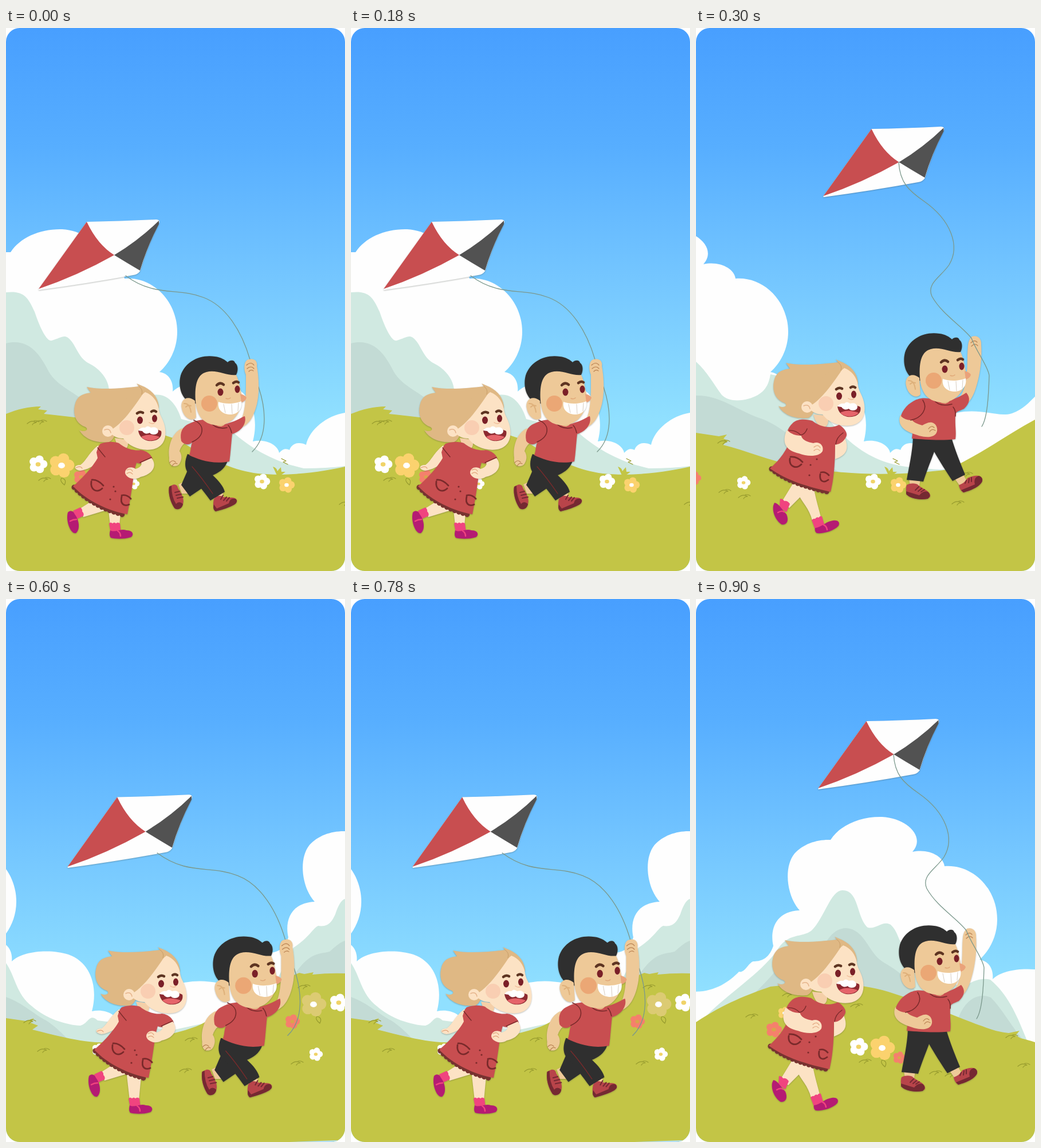
Write an HTML page that moves like this. It is 592 px wide and 947 px high and loops after 1.2 s.

```html
<!DOCTYPE html>
<html lang="en">
<head>
<meta charset="utf-8">
<title>Kite run</title>
<style>
html, body { margin: 0; width: 100%; height: 100%; overflow: hidden; background: #fff; }
svg { display: block; width: 592px; height: 947px; }
.soft { filter: drop-shadow(0 1.5px 1px rgba(60, 70, 60, .35)); }
</style>
</head>
<body>
<svg id="stage" viewBox="0 0 592 947"></svg>
<script>
const C = {
  hill: '#c3c546', grass: '#969a2e', mint: '#d0e9e1', slate: '#c3dbd5', red: '#c84e50', dark: '#7a2a2b',
  ink: '#2f2f2f', tan: '#eec998', fair: '#fce2c4', hair: '#dfb884', eye: '#7a2028', brow: '#5e3522',
  pink: '#f0447f', plum: '#b51b73', shoe: '#b8444a', sole: '#752932', string: '#7b988c'
};
const fill = (d, c) => `<path d="${d}" fill="${c}"/>`;
const line = (d, c, w = 1.5) =>
  `<path d="${d}" fill="none" stroke="${c}" stroke-width="${w}" stroke-linecap="round" stroke-linejoin="round"/>`;
const dot = (x, y, rx, c, ry = rx) => `<ellipse cx="${x}" cy="${y}" rx="${rx}" ry="${ry}" fill="${c}"/>`;
const group = (id, ...parts) => `<g id="${id}">${parts.join('')}</g>`;
const use = (id, x = 0, y = 0) => `<use href="#${id}" transform="translate(${x} ${y})"/>`;

const cloud = fill('M-240 900V655C-200 660-170 640-152 621C-142 624-135 605-127 603C-115 603-100 600-92 576' +
  'C-98 550-90 516-46 514C-68 490-75 440-55 415C-40 398-15 390 8 391C25 365 60 350 98 351C140 353 175 385 151 412' +
  'C180 406 205 420 207 437C255 433 299 475 299 530C299 560 285 585 268 600C285 602 293 618 291 634' +
  'C310 615 360 612 390 622C430 636 442 680 431 721C455 716 475 728 477 741C484 733 490 733 495 736' +
  'C500 722 515 722 524 727C530 700 560 676 592 671C640 662 665 680 690 672C712 664 722 650 735 638L780 620V900Z', '#fefefe');

const kite = [
  fill('M57 455L141 338Q200 337 262 334Q270 334 267 341Q247 380 234 424Q230 430 222 431Q140 446 57 457Z', '#fefefe'),
  fill('M57 455L141 338Q160 378 189 396Q125 432 57 455Z', C.red),
  fill('M267 336Q232 370 189 396Q210 409 234 423Q246 382 267 342Z', '#525252')
];

const boyHead = [
  fill('M328 655C306 650 300 625 305 606C313 582 338 569 365 573C375 574 383 579 387 583C392 578 399 579 400 584C406 588 406 600 400 608L345 616L332 655Z', C.ink),
  fill('M331 650C329 620 335 604 350 600C368 595 385 607 402 605C408 618 409 630 411 638C415 660 402 692 370 693C348 692 333 680 331 650Z', C.tan),
  fill('M330 650C317 639 303 648 307 664C311 682 326 687 332 679Z', C.tan),
  line('M311 655Q321 654 323 670M314 661Q318 657 323 659', '#deb07a', 2),
  dot(355, 655, 14, '#eba775'),
  fill('M409 638Q419 641 420 645Q418 651 411 653Z', '#eaa27a'),
  line('M384 646Q389 648 392 645', '#e0a878'),
  dot(374.5, 635, 5, C.eye, 6.5), dot(404, 630, 4.5, C.eye, 6.5),
  line('M368 623Q374 617 380 622M397 619Q402 615 406 618', C.brow, 4.5),
  fill('M371 652C384 657 402 655 411 651C414 668 400 675 390 674C377 673 369 665 371 652Z', '#fff'),
  line('M380 656l3 15M394 656l1 17M406 654l-1 14', '#d8cdc0', 1)
];

const girlHead = [
  fill('M141 626C170 632 205 628 232 625L228 620L242 626C257 634 266 645 267 662L200 682C190 692 195 715 180 722C160 724 138 719 128 701C136 706 146 701 139 696C121 690 116 672 121 655C125 641 135 638 148 636Z', C.hair),
  fill('M180 702C194 688 212 660 243 635C256 640 264 650 267 665C268 675 273 680 276 690C282 710 278 731 255 735C235 738 215 730 205 716C195 716 185 712 180 702Z', C.fair),
  fill('M182 702C203 690 222 664 245 629L238 625L205 650L183 684Z', C.hair),
  line('M232 625Q240 630 237 639', '#c99e68', 1),
  dot(178, 703, 10, C.fair), line('M172 701Q181 697 183 706', '#e5b48c', 1.5),
  dot(211, 697, 13, '#f9ceb2'),
  dot(234, 684, 5, C.eye, 6.5), dot(259.5, 681, 4.5, C.eye, 6.5),
  line('M229 672Q234 668 239 671M254 669Q258 666 262 669', C.brow, 4.5),
  line('M250 688Q256 692 260 688', '#efb995'),
  fill('M231 702C245 697 262 698 271 703C274 715 262 722 248 720C238 718 232 711 231 702Z', '#8c2a30'),
  fill('M236 713Q248 706 268 713C262 721 244 722 236 713Z', '#e5646a'),
  fill('M231 702Q235 696 243 697Q247 692 253 697Q263 694 266 702Q266 709 258 709Q253 709 251 706Q243 710 238 703Z', '#fff')
];

const boyStride = [
  fill('M308 698C290 705 282 730 285 750C283 765 297 768 303 760C309 750 306 742 303 738C307 725 315 722 322 718Z', C.tan),
  fill('M403 692C420 680 419 640 419 605C413 590 418 578 424 578C432 575 440 580 438 590C442 610 443 640 437 660C430 685 420 693 410 697Z', C.tan),
  line('M286 758Q291 752 296 757M290 764Q294 757 299 760M420 588Q428 581 433 588M421 594Q428 588 433 594M424 599Q428 595 432 598', '#b98252', 1.2),
  fill('M301 796L313 790L322 812L307 812ZM362 818L378 808L381 822L367 827Z', C.tan),
  fill('M289 798C295 794 300 798 300 802C305 810 312 820 309 830C308 838 298 842 294 837C286 825 283 810 285 800Z', C.shoe),
  fill('M285 800C283 812 287 826 294 837C300 842 308 838 309 830Q302 824 297 830Q289 818 289 798Z', C.sole),
  fill('M363 822C366 814 375 815 380 818C390 820 400 817 403 823C405 830 395 835 366 843C362 840 361 830 363 822Z', C.shoe),
  fill('M366 843C361 840 362 834 363 831L368 838L389 829Q391 819 401 821Q406 826 399 831Q387 838 366 843Z', C.sole),
  line('M295 810l8-2M297 815l9-2M299 820l10-2M375 822l4-7M380 824l5-6M385 825l5-6', C.sole, 2),
  fill('M320 765L306 797L321 817L358 792L350 760Z', C.ink),
  fill('M317 743C340 752 365 758 387 755C382 770 370 776 361 780C372 790 380 800 382 809L357 824C345 808 328 786 322 780C310 770 312 755 317 743Z', C.ink),
  line('M325 765Q341 783 361 812', C.dark, 1.3),
  fill('M320 690C335 682 352 682 358 685C368 698 385 690 395 687C405 684 413 678 417 677C421 690 410 704 395 708C393 725 392 745 390 756C360 762 335 752 320 745C324 735 322 725 327 721C318 731 308 724 306 720C303 705 308 695 320 690Z', C.red),
  fill('M357 680L384 680Q386 692 376 695Q363 695 357 680Z', '#e5bb88'),
  line('M328 684C348 692 347 712 325 722M356 686Q366 701 386 697M394 706Q392 697 388 693', C.dark, 1.6),
  use('boyHead')
];

const boyStep = [
  fill('M460 645C472 630 474 600 474 570C475 555 474 545 482 538C490 535 499 540 498 552C500 580 495 610 488 630C482 648 475 655 465 660Z', C.tan),
  line('M480 549Q486 543 491 548M481 555Q487 549 492 554', '#b98252', 1.2),
  fill('M372 786H392L390 799L374 800ZM452 786L466 778L473 790L461 799Z', C.tan),
  fill('M368 797C375 793 385 794 388 797C397 805 410 807 409 817C405 824 385 823 372 817C366 812 366 803 368 797Z', C.shoe),
  fill('M367 808L390 815Q397 806 405 809Q412 815 405 821C388 824 374 820 367 813Z', C.sole),
  fill('M459 797C465 795 470 792 474 785C485 780 497 778 500 787C500 797 485 805 467 810C463 808 460 803 459 797Z', C.shoe),
  fill('M463 806L487 796Q484 784 494 781Q501 783 500 790C497 799 482 806 467 810Z', C.sole),
  line('M383 806l6-6M388 808l6-5M393 809l6-4M470 794l2-5M476 793l1-7M481 791v-7', C.sole, 2),
  fill('M379 714H446C452 735 462 760 470 779L448 790C438 775 425 755 416 739C410 755 402 775 397 791L368 788C372 765 378 740 379 714Z', C.ink),
  fill('M375 655C390 642 402 645 415 648C430 655 450 650 472 636C480 645 478 655 468 664C460 668 454 668 453 675C452 695 455 705 453 717C430 720 400 718 377 716L380 690C370 690 362 682 358 677C360 668 366 662 375 655Z', C.red),
  fill('M417 642L445 642Q446 652 436 655Q423 655 417 642Z', '#e5bb88'),
  fill('M357 675C352 688 358 699 375 706C390 712 405 716 415 711C425 706 422 690 412 688C405 687 400 691 395 693C384 690 378 686 376 682Z', C.tan),
  fill('M358 677C362 664 370 655 385 648L401 653C402 670 392 684 374 684Q364 683 358 677Z', C.red),
  line('M396 649C406 664 394 680 375 684M415 648Q425 662 447 656M453 677Q454 667 449 661', C.dark, 1.6),
  line('M406 699Q411 692 416 697M408 704Q412 698 418 702', '#b98252', 1.2),
  use('boyHead', 60, -40)
];

const hem = d => `<path d="${d}" fill="none" stroke="#773230" stroke-width="9" stroke-linecap="round" stroke-dasharray="0 7.5"/>`;
const girlLeg = [
  fill('M176 815L202 825L198 868H182Z', C.fair),
  fill('M180 864q3-3 6 0q3-3 6 0q3-3 7 0L201 880H183Z', C.pink),
  fill('M182 876C190 881 200 872 210 876C222 876 224 884 218 888C205 892 190 891 183 889C180 885 181 880 182 876Z', C.plum),
  line('M195 877Q200 880 200 886', C.pink, 2.5)
];
const girlStride = [
  fill('M161 728C145 740 140 755 130 762C118 762 117 770 130 772C145 770 160 760 172 748Z', C.fair),
  line('M122 767Q130 763 133 768', '#e0a27a', 1.2),
  fill('M150 825L178 840L135 853L131 837Z', C.fair),
  fill('M117 842L130 836q4 4 3 7q4 4 2 8L122 857Z', C.pink),
  fill('M108 845C112 840 118 842 120 848C128 858 130 875 122 881C113 883 104 860 108 845Z', C.plum),
  line('M112 860Q117 857 123 857', C.pink, 2.5),
];
const girlDress = [
  hem('M119 801C140 824 175 843 210 850'),
  fill('M190 715L212 718Q216 734 204 735Q194 732 190 715Z', '#f4cfa8'),
  fill('M165 725C180 720 190 722 197 724C210 735 228 738 235 736C250 738 255 748 256 752C245 760 235 761 228 758C222 775 222 800 212 848C180 843 140 824 117 799C135 785 155 760 160 750L158 740C160 735 160 730 165 725Z', C.red),
  line('M150 788Q160 787 170 798M149 791C147 805 158 812 168 803M202 815Q211 813 218 821M202 817C199 830 206 835 215 831', C.dark, 2.8),
  line('M160 732Q167 741 173 748M234 758Q247 752 254 749', C.dark, 1.4),
  dot(188, 800, 1.6, C.dark), dot(191, 808, 1.6, C.dark), dot(182, 822, 1.6, C.dark),
  fill('M254 750C264 762 258 778 235 783C225 790 210 785 208 776C208 766 220 764 226 769C235 767 238 761 236 758Z', C.fair),
  line('M211 771Q218 767 221 773M211 777Q217 773 221 778', '#e0a27a', 1.2),
  use('girlHead')
];
const girlStep = [
  fill('M260 715C268 735 262 745 243 752L243 722Z', C.fair),
  fill('M172 790L200 800L163 837L150 826Z', C.fair),
  fill('M180 796L206 804C210 825 215 840 218 853L203 859C198 838 185 827 178 812Z', C.fair),
  fill('M147 821q5 0 7 4q6-1 10 5L158 844L146 836Z', C.pink),
  fill('M137 828C145 829 150 840 158 848C163 860 158 867 150 866C140 860 133 845 135 833Z', C.plum),
  line('M143 845Q149 841 154 844', C.pink, 2.5),
  fill('M202 858q4-3 6-2q3-4 6-2q3-4 6-2L225 869L208 874Z', C.pink),
  fill('M208 872C218 871 226 862 235 860C248 856 252 862 249 868C240 878 222 882 211 881C208 879 207 876 208 872Z', C.plum),
  line('M222 866Q228 868 229 875', C.pink, 2.5),
  hem('M132 769C155 789 195 802 235 810'),
  fill('M205 674L230 676Q234 694 222 697Q210 694 205 674Z', '#f4cfa8'),
  fill('M170 688C180 680 195 683 203 685C215 695 235 700 250 692C262 700 265 708 262 713C258 722 248 728 243 726C243 760 240 790 235 809C195 800 160 790 129 768C145 755 160 735 166 715L160 702C163 695 166 692 170 688Z', C.red),
  line('M165 748Q177 747 186 757M164 751C162 765 175 770 184 761M218 775Q226 773 232 780M217 778C215 791 223 794 231 788', C.dark, 2.8),
  dot(211, 752, 1.6, C.dark), dot(200, 762, 1.6, C.dark), dot(198, 780, 1.6, C.dark),
  fill('M158 702C149 725 158 737 180 742C195 748 215 748 221 738C224 728 215 720 205 724C192 722 182 716 184 708Z', C.fair),
  fill('M161 703C164 692 172 684 184 684L194 693Q194 708 182 711Q168 710 161 703Z', C.red),
  line('M163 702Q174 701 183 710Q191 708 194 699M244 726Q245 714 257 706', C.dark, 1.4),
  line('M206 731Q213 725 217 732M206 737Q212 732 216 737', '#e0a27a', 1.2),
  use('girlHead', 16, -42)
];

// x, y, radius, kind
const kinds = { w: ['#fff', '#f0d368'], y: ['#fbd26e', '#fff'], s: ['#f5806c', '#d9a54c'], t: ['#dccb73', '#fff'] };
const flower = ([x, y, r, k]) => {
  const [petal, core] = kinds[k];
  let out = '';
  for (let i = 0; i < 5; i++) {
    const a = i * Math.PI * .4 - 1.3;
    out += dot(x + r * .57 * Math.cos(a), y + r * .54 * Math.sin(a), r * .45, petal);
  }
  return out + dot(x, y, r * .4, petal) + dot(x, y, r * .27, core, r * .23);
};
const blade = ([x, y]) => line(`M${x - 10} ${y + 2}q8-7 16-2q-5 0-7 4M${x + 2} ${y - 3}q5-1 9 2`, C.grass, 1.2);
const leaf = (x, y) => line(`M${x} ${y + 8}q-9-7-5-12q10 2 5 12`, C.grass, 1.2);
const sprout = (x, y) => fill(`M${x - 9} ${y - 9}q7 2 8 8q2-3 6-7l1 8l7 0q-10 8-14 8z`, C.hill) +
  line(`M${x + 6} ${y - 23}l8 4l-5 2l8 4`, C.grass, 1.2);

const strideString = line('M209 432C260 470 300 452 345 470C385 485 412 530 426 578M441 626C454 665 458 712 430 739', C.string, 1.3);
const stepString = line('M354 234C356 270 372 284 398 302C445 335 462 380 442 413C428 434 402 445 412 468C430 500 465 520 481 541C490 565 510 590 512 606C511 640 509 680 499 695', C.string, 1.3);

const strideBoy = tf => `<g transform="${tf}"><g class="soft">${kite.join('')}</g>${strideString}<g class="soft">${use('boyStride')}</g></g>`;
const stepBoy = (x, y) => `<g transform="translate(${x} ${y})"><g class="soft">${use('kite', 165.5, -162)}${use('boyStep')}</g>${stepString}</g>`;
const strideGirl = (x, y, lx, ly) =>
  `<g class="soft" transform="translate(${x} ${y})">${use('girlStride')}${use('girlLeg', lx, ly)}${use('girlDress')}</g>`;

const scenes = [
  {
    clouds: [[0, 0]],
    mint: 'M0 461C30 458 38 468 50 495C60 525 72 548 80 545C95 541 100 535 108 540C122 550 125 575 145 585C165 595 178 612 180 630L258 640C285 636 300 662 306 682L395 704C430 735 470 757 520 768Q560 768 592 764V790H0Z',
    slate: 'M0 550C40 540 60 570 75 600C90 625 120 635 135 650L160 720H0Z',
    hill: 'M0 673C20 665 40 660 61 660L56 665L72 667L66 673L76 674C160 683 230 693 300 718C340 742 385 770 440 777C500 783 560 772 592 765V947H0Z',
    flowers: [[56, 761, 16, 'w'], [97, 763, 22, 'y'], [131, 783, 13, 's'], [223, 795, 10, 'w'], [447, 791, 14, 'w'], [490, 797, 14, 'y']],
    blades: [[47, 688], [60, 687], [67, 787], [592, 829]],
    extra: leaf(102, 789) + sprout(475, 774),
    cast: strideGirl(0, 0, 0, 0) + strideBoy('translate(0 0)')
  },
  {
    clouds: [[-138, 0]],
    mint: 'M0 582C20 600 30 620 45 640C60 655 90 650 108 640C125 630 128 615 130 604L160 610L262 715C300 750 340 766 400 768Q430 772 450 768V790H0Z',
    slate: 'M0 641C40 640 70 665 110 680C150 692 190 735 250 775H0Z',
    hill: 'M0 706L40 712L54 709L48 716L56 720L47 727C100 740 150 765 220 771C300 782 380 778 440 770C500 742 550 705 592 683V947H0Z',
    flowers: [[-3, 785, 12, 's'], [83, 793, 12, 'w'], [309, 791, 14, 'w'], [353, 797, 14, 'y']],
    blades: [[50, 808], [84, 817], [457, 828], [472, 778], [48, 722]],
    extra: sprout(338, 774),
    cast: `<g class="soft">${use('girlStep')}</g>` + stepBoy(0, 0)
  },
  {
    clouds: [[-281, -2], [585, 14]],
    mint: 'M0 635C15 655 18 690 45 710C70 732 105 743 130 744C145 740 145 722 160 735L290 752L355 738V790H0ZM470 670L502 608C530 590 535 575 545 570C565 573 570 560 575 550C580 535 585 525 592 523V670Z',
    slate: 'M0 694C30 705 50 725 70 735C90 748 100 760 115 775H0ZM500 660C530 615 545 620 565 615C580 602 585 598 592 596V665Z',
    hill: 'M0 731L35 736L49 731L43 739L56 744L46 751C90 762 140 775 170 773C230 771 300 760 340 742C420 700 470 660 500 657L512 652L521 654L537 651L535 655Q565 652 592 653V947H0Z',
    flowers: [[500, 737, 13, 's'], [537, 707, 22, 't'], [581, 704, 16, 'w'], [541, 794, 12, 'w'], [161, 786, 11, 'w']],
    blades: [[65, 787], [41, 737], [323, 768], [313, 822], [508, 809], [520, 676]],
    extra: leaf(548, 732) + fill('M495 947L578 944V947Z', '#b5e0f3'),
    cast: strideGirl(37, -13, -3, 20) + strideBoy('matrix(1.03 0 0 1.037 49 -5)')
  },
  {
    clouds: [[227, 29]],
    mint: 'M18 727C60 685 110 655 140 615C160 580 185 592 202 578C225 555 235 508 256 508C285 508 280 555 300 573C315 577 325 560 340 568C358 585 350 605 380 620L465 680C480 665 500 660 514 664C545 690 560 725 578 770V800H18Z',
    slate: 'M100 690C130 660 140 650 150 630L200 650C225 600 235 575 262 574C295 576 300 615 325 632C345 645 380 660 400 720ZM455 740C470 690 500 688 515 695C535 715 550 745 574 772Z',
    hill: 'M0 738C50 705 90 690 130 676C230 664 300 672 345 688C420 712 470 735 500 745C520 753 535 756 546 757L565 753L558 761L567 766C575 768 584 770 592 773V947H0Z',
    flowers: [[136, 751, 14, 's'], [154, 722, 11, 'y'], [284, 781, 16, 'w'], [325, 783, 22, 'y'], [355, 800, 11, 's']],
    blades: [[97, 727], [161, 690], [280, 709], [295, 806], [551, 763], [572, 813], [418, 826], [445, 830]],
    extra: leaf(330, 808),
    cast: `<g class="soft">${use('girlStep', -2, 11)}</g>` + stepBoy(-9, 37)
  }
];

const draw = s => `<g class="scene" display="none">` +
  s.clouds.map(c => use('cloud', ...c)).join('') + fill(s.mint, C.mint) + fill(s.slate, C.slate) + fill(s.hill, C.hill) +
  s.blades.map(blade).join('') + s.extra + s.flowers.map(flower).join('') + s.cast + '</g>';

const stage = document.getElementById('stage');
stage.innerHTML = `<defs>
  <linearGradient id="sky" x2="0" y2="1">
    <stop offset="0" stop-color="#489fff"/><stop offset=".22" stop-color="#57aeff"/>
    <stop offset=".45" stop-color="#73c5ff"/><stop offset=".72" stop-color="#90e0ff"/>
  </linearGradient>
  <clipPath id="card"><rect width="592" height="947" rx="24"/></clipPath>` +
  Object.entries({ cloud: [cloud], kite, boyHead, girlHead, boyStride, boyStep, girlLeg, girlStride, girlDress, girlStep })
    .map(([id, parts]) => group(id, ...parts)).join('') +
  `</defs><g clip-path="url(#card)"><rect width="592" height="947" fill="url(#sky)"/>${scenes.map(draw).join('')}</g>`;

const layers = [...stage.querySelectorAll('.scene')];
const HOLD = 300;
let shown = -1;
const start = performance.now();
function tick(now) {
  const i = Math.floor(Math.max(0, now - start) / HOLD) % layers.length;
  if (i !== shown) {
    layers.forEach((g, k) => g.setAttribute('display', k === i ? 'inline' : 'none'));
    shown = i;
  }
  requestAnimationFrame(tick);
}
tick(start);
</script>
</body>
</html>
```
